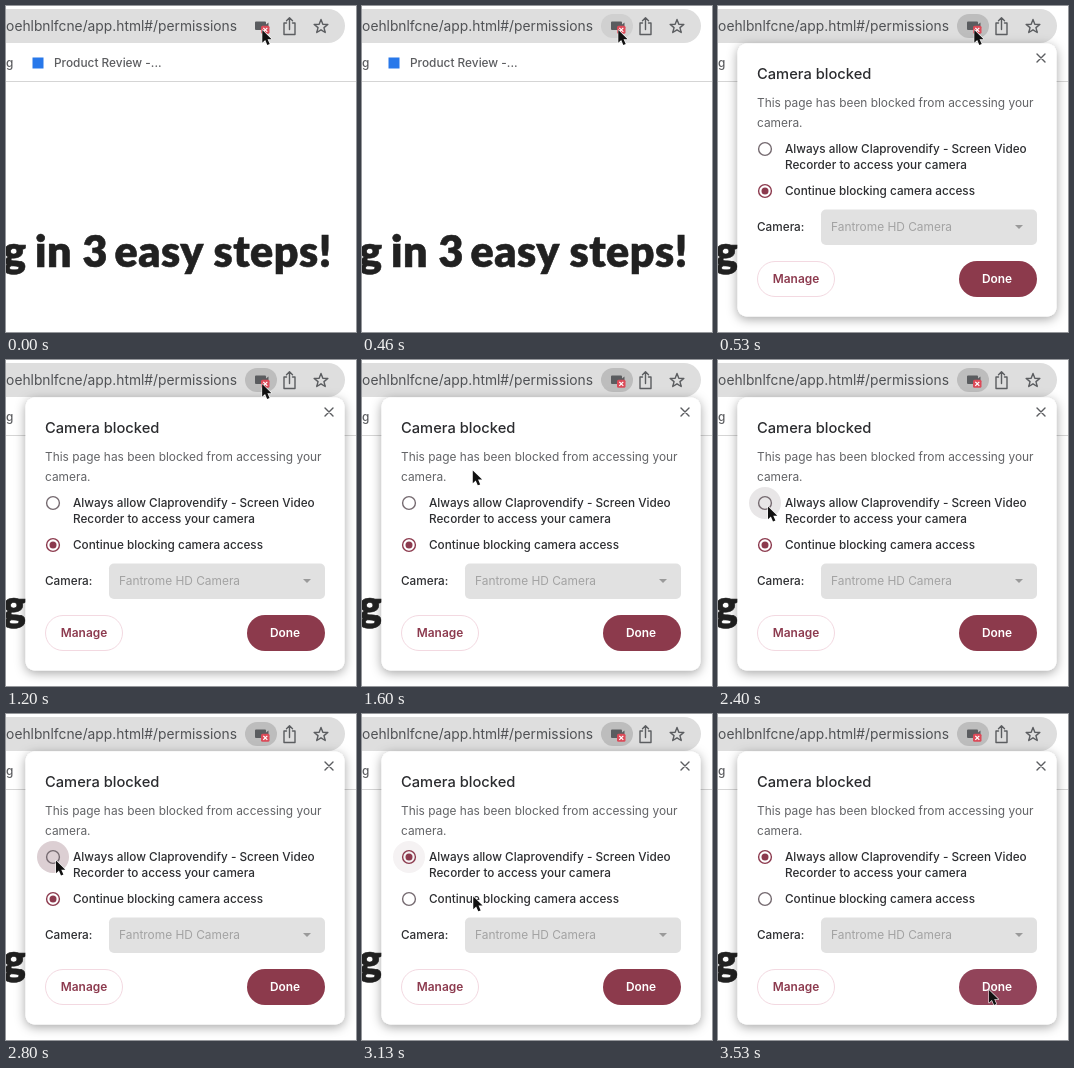
Recreate the animation shown at these times as an HTML page. Size 350x326 px, loop 3600 ms.

```html
<!DOCTYPE html>
<html lang="en">
<head>
<meta charset="utf-8">
<title>Camera permission</title>
<style>
  html, body { margin: 0; width: 100%; height: 100%; overflow: hidden; background: #fff; }
  svg { display: block; width: 350px; height: 326px; font-family: Inter, Roboto, sans-serif; }
  .url { font-size: 13.8px; fill: #505255; }
  .mark { font-size: 11.85px; font-weight: 450; fill: #5c5d60; }
  .head { font: 900 43px Lato, "Open Sans", sans-serif; letter-spacing: .55px; fill: #212121; stroke: #212121; stroke-width: .6; }
  .title { font-size: 14.7px; font-weight: 500; fill: #2b2c2f; }
  .body { font-size: 11.9px; fill: #636467; }
  .opt { font-size: 11.75px; font-weight: 500; fill: #2d2e31; }
  .btn { font-size: 11.9px; font-weight: 600; text-anchor: middle; }
  .line { fill: none; stroke: #5b5d60; stroke-width: 1.4; stroke-linecap: round; stroke-linejoin: round; }
</style>
</head>
<body>
<svg viewBox="0 0 350 326">
  <defs>
    <filter id="shade" x="-20%" y="-20%" width="140%" height="140%">
      <feDropShadow dx="0" dy="2.5" stdDeviation="5.5" flood-color="#000" flood-opacity=".36"/>
    </filter>
  </defs>
  <rect width="350" height="326" fill="#fff"/>

  <rect x="-40" y="3" width="379" height="34" rx="17" fill="#dedede"/>
  <text class="url" x="231" y="25" text-anchor="end">oehlbnlfcne/app.html#/permissions</text>
  <rect id="pill" x="239" y="8" width="32" height="24" rx="12" fill="#bdbdbd"/>
  <g>
    <path d="M250 15.5h9a1 1 0 0 1 1 1v2l2.500-2v7.500l-2.500-2v2h-10a1 1 0 0 1-1-1v-6.500a1 1 0 0 1 1-1z" fill="#5a5c5f"/>
    <rect x="255" y="19.800" width="8.500" height="8" rx="1.500" fill="#dc4a58"/>
    <path d="M257.300 21.800l4 4m0-4l-4 4" stroke="#fff" stroke-width="1.200"/>
  </g>
  <path class="line" d="M280.500 17h-2.500v11.500h11v-11.500h-2.500M283.500 23.500v-11.500M280.500 14.700l3-3 3 3"/>
  <path id="star" class="line"/>

  <text class="mark" x="0" y="61">g</text>
  <rect x="26.500" y="51.500" width="11" height="11" fill="#2878ea"/>
  <text class="mark" x="48" y="61">Product Review -...</text>
  <rect y="75" width="350" height="1" fill="#d5d5d5"/>

  <text class="head" y="261"><tspan x="-3">g</tspan> <tspan x="29">in</tspan> <tspan x="76.500">3</tspan> <tspan x="108.500">easy</tspan> <tspan x="207.500">steps!</tspan></text>

  <g id="popup">
    <rect x="19.500" y="37.500" width="319" height="273" rx="9" fill="#fff" filter="url(#shade)"/>
    <path class="line" d="M319 48l8 8m0-8l-8 8"/>
    <text class="title" x="39" y="73">Camera blocked</text>
    <text class="body" x="39" y="101">This page has been blocked from accessing your</text>
    <text class="body" x="39" y="121">camera.</text>
    <circle id="halo" cx="47" cy="143" r="16"/>
    <g id="radios"></g>
    <text class="opt" x="67" y="147">Always allow Claprovendify - Screen Video</text>
    <text class="opt" x="67" y="163">Recorder to access your camera</text>
    <text class="opt" x="67" y="189">Continue blocking camera access</text>
    <text class="opt" x="39" y="225">Camera:</text>
    <rect x="103" y="203.500" width="216" height="35.500" rx="5" fill="#e1e1e1"/>
    <text class="body" x="113" y="225" style="fill:#a3a3a3">Fantrome HD Camera</text>
    <path d="M297 219h8l-4 4z" fill="#9a9a9a"/>
    <rect x="39.500" y="255.500" width="77" height="35" rx="17.500" fill="#fff" stroke="#f3d9e1"/>
    <text class="btn" x="78" y="277" fill="#8c3a4e">Manage</text>
    <rect id="done" x="241" y="255" width="78" height="36" rx="18"/>
    <text class="btn" x="279" y="277" fill="#fff">Done</text>
  </g>

  <path id="cursor" d="M0 0v14.500l3.300-3.100 2.400 5.600 2.700-1.100-2.400-5.500h4.600z" fill="#111" stroke="#fff" stroke-width="1.200" stroke-linejoin="round" paint-order="stroke"/>
</svg>
<script>
const LOOP = 3600, STEP = 1000 / 15;
const $ = id => document.getElementById(id);
const set = (el, attrs) => { for (const k in attrs) el.setAttribute(k, attrs[k]); };
const ramp = (t, a, b) => Math.min(1, Math.max(0, (t - a) / (b - a)));
const ease = p => p * p * (3 - 2 * p);
const mix = (a, b, p) => a + (b - a) * p;

function makeRadio(y) {
  const add = (r, attrs) => {
    const c = document.createElementNS("http://www.w3.org/2000/svg", "circle");
    set(c, { cx: 47, cy: y, r, ...attrs });
    return $("radios").appendChild(c);
  };
  const ring = add(6.4, { fill: "none", "stroke-width": 1.4 });
  const dot = add(3.5, { fill: "#8c3a4e" });
  return on => {
    set(ring, { stroke: on ? "#8c3a4e" : "#756a70" });
    set(dot, { opacity: on ? 1 : 0 });
  };
}
const allow = makeRadio(143), block = makeRadio(185);

const points = Array.from({ length: 10 }, (_, i) => {
  const r = i % 2 ? 3.1 : 7.2, a = (i / 5 - 0.5) * Math.PI;
  return (315 + r * Math.cos(a)).toFixed(2) + " " + (20.7 + r * Math.sin(a)).toFixed(2);
});
set($("star"), { d: "M" + points.join("L") + "z" });

function cursorAt(t) {
  const a = ease(ramp(t, 1190, 1830)), b = ease(ramp(t, 2960, 3460));
  return [mix(mix(256.3, 50, a), 271, b), mix(mix(24, 146.5, a), 276, b)];
}

function draw(time) {
  const t = Math.floor((time % LOOP + 6.7) / STEP) * STEP;
  const open = t > 500, chosen = t > 2900;
  const [x, y] = cursorAt(t);
  set($("popup"), { visibility: open ? "visible" : "hidden" });
  set($("pill"), { opacity: open ? 1 : 0.42 * ramp(t, 60, 330) });
  allow(chosen);
  block(!chosen);
  const press = ramp(t, 2700, 2800);
  set($("halo"), {
    fill: press ? "#6b3848" : "#5c4c54",
    opacity: mix(0.14, 0.24, press) * ramp(t, 1700, 1870) * (1 - ramp(t, 2980, 3190))
  });
  set($("done"), { fill: y > 255 ? "#92445a" : "#8c3a4c" });
  set($("cursor"), { transform: `translate(${x.toFixed(2)} ${y.toFixed(2)}) scale(.88)` });
}

function tick(now) {
  draw(now);
  requestAnimationFrame(tick);
}
draw(0);
requestAnimationFrame(tick);
</script>
</body>
</html>
```
